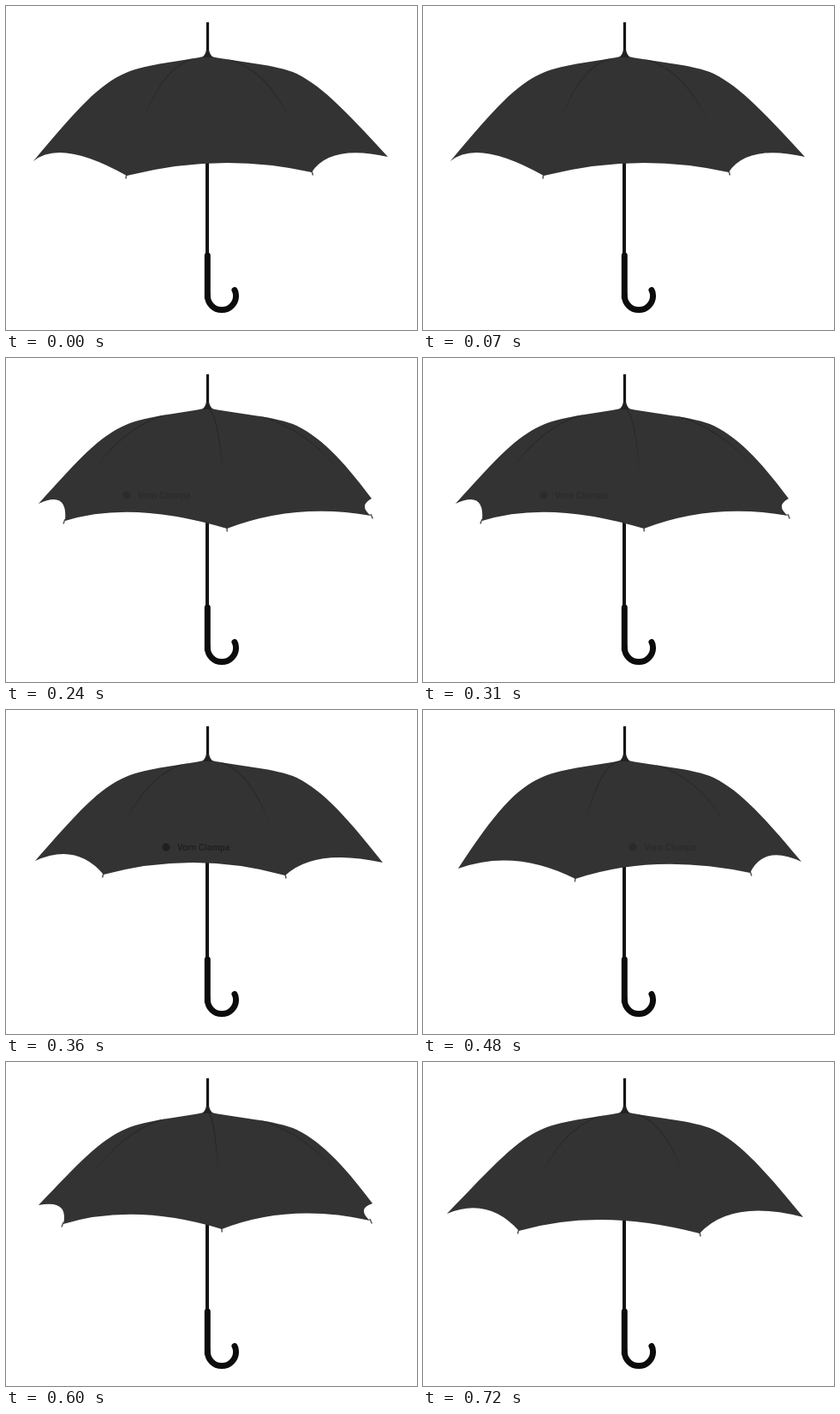
Recreate the animation shown at these times as an HTML page with a canvas. Size 480x378 px, loop 0.84 s.

```html
<!DOCTYPE html>
<html lang="en">
<head>
<meta charset="utf-8">
<title>Turning umbrella</title>
<style>
  html, body { margin: 0; width: 100%; height: 100%; overflow: hidden; background: #fff; }
  canvas { display: block; width: 480px; height: 378px; }
</style>
</head>
<body>
<canvas id="stage" width="480" height="378"></canvas>
<script>
const ctx = document.getElementById('stage').getContext('2d');
const STEP = 120;
const APEX = [235, 58];

// hem: rib tips alternating with the midpoint of each scallop, left to right
// print: [left edge, strength] of the lettering
const POSES = [
  { hem: [32,181, 75,172, 141,198, 250,183, 357,194, 390,173, 446,176] },
  { hem: [49,164, 55,171, 45,186, 112,179, 203,202, 292,184, 402,191, 411,170, 440,171] },
  { hem: [38,170, 63,167, 69,190, 155,180, 258,199, 340,180, 426,184, 419,173, 427,164], print: [136, 0.3] },
  { hem: [34,176, 78,169, 114,192, 220,178, 326,193, 372,173, 440,178], print: [182, 0.8] },
  { hem: [41,185, 108,176, 178,197, 275,180, 382,190, 405,170, 442,177], print: [240, 0.35] },
  { hem: [38,167, 63,169, 67,189, 155,178, 252,195, 335,177, 425,185, 418,173, 428,165] },
  { hem: [28,177, 73,172, 112,197, 212,184, 323,200, 372,175, 444,181] }
];

function canopyPath(hem) {
  const path = new Path2D();
  path.moveTo(...APEX);
  path.bezierCurveTo(205, 65, 165, 67, 140, 78);
  path.bezierCurveTo(108, 92, 85, 118, hem[0], hem[1]);
  for (let i = 0; i + 5 < hem.length; i += 4) {
    const [ax, ay, mx, my, bx, by] = hem.slice(i, i + 6);
    path.quadraticCurveTo(2 * mx - (ax + bx) / 2, 2 * my - (ay + by) / 2, bx, by);
  }
  path.bezierCurveTo(392, 117, 365, 90, 335, 77);
  path.bezierCurveTo(307, 67, 267, 65, ...APEX);
  path.closePath();
  return path;
}

function stroke(color, width, draw) {
  ctx.strokeStyle = color;
  ctx.lineWidth = width;
  ctx.beginPath();
  draw();
  ctx.stroke();
}

function drawHandle() {
  ctx.lineCap = 'butt';
  stroke('#111', 4, () => { ctx.moveTo(235, 170); ctx.lineTo(235, 292); });
  ctx.lineCap = 'round';
  stroke('#0c0c0c', 7, () => {
    ctx.moveTo(235.3, 291);
    ctx.lineTo(235.3, 338);
    ctx.arc(252, 338, 16.6, Math.PI, 0, true);
    ctx.quadraticCurveTo(268.6, 334, 267, 331.5);
  });
}

function drawRibs(tips) {
  const fade = ctx.createLinearGradient(0, 60, 0, 150);
  fade.addColorStop(0, 'rgba(34,34,34,.8)');
  fade.addColorStop(0.5, 'rgba(38,38,38,.7)');
  fade.addColorStop(1, 'rgba(51,51,51,0)');
  const [ax, ay] = APEX;
  for (const [x, y] of tips) {
    const dx = x - ax;
    stroke(fade, 1.2, () => {
      ctx.moveTo(ax, ay);
      ctx.bezierCurveTo(ax + dx * 0.45, 60, ax + dx * 0.75, 100, x, y);
    });
  }
}

function drawPrint([x, strength]) {
  ctx.save();
  ctx.globalAlpha = strength;
  ctx.fillStyle = '#1c1c1c';
  ctx.beginPath();
  ctx.arc(x + 5, 160, 4.5, 0, Math.PI * 2);
  ctx.fill();
  ctx.font = 'bold 10px "Liberation Sans", Arial, sans-serif';
  ctx.fillText('Vorn Clompa', x + 18, 164);
  ctx.restore();
}

function drawFerrule() {
  ctx.lineCap = 'butt';
  stroke('#151515', 3.2, () => { ctx.moveTo(235.5, 19); ctx.lineTo(235.5, 58); });
  ctx.fillStyle = '#222';
  ctx.beginPath();
  ctx.moveTo(234, 51);
  ctx.quadraticCurveTo(233, 57, 229, 60);
  ctx.lineTo(242, 60);
  ctx.quadraticCurveTo(238, 57, 237, 51);
  ctx.fill();
}

function drawPose({ hem, print }) {
  ctx.fillStyle = '#fff';
  ctx.fillRect(0, 0, 480, 378);
  drawHandle();

  const tips = [];
  for (let i = 4; i + 3 < hem.length; i += 4) tips.push([hem[i], hem[i + 1]]);

  ctx.lineCap = 'butt';
  for (const [x, y] of tips) {
    const lean = (x - APEX[0]) * 0.012;
    stroke('#555', 1.5, () => { ctx.moveTo(x, y - 2); ctx.lineTo(x + lean, y + 3.5); });
  }

  const canopy = canopyPath(hem);
  ctx.fillStyle = '#333';
  ctx.fill(canopy);
  ctx.save();
  ctx.clip(canopy);
  drawRibs(tips);
  if (print) drawPrint(print);
  ctx.restore();
  drawFerrule();
}

let shown = -1;
function tick() {
  const pose = Math.floor(performance.now() / STEP) % POSES.length;
  if (pose !== shown) drawPose(POSES[shown = pose]);
  requestAnimationFrame(tick);
}
tick();
</script>
</body>
</html>
```
